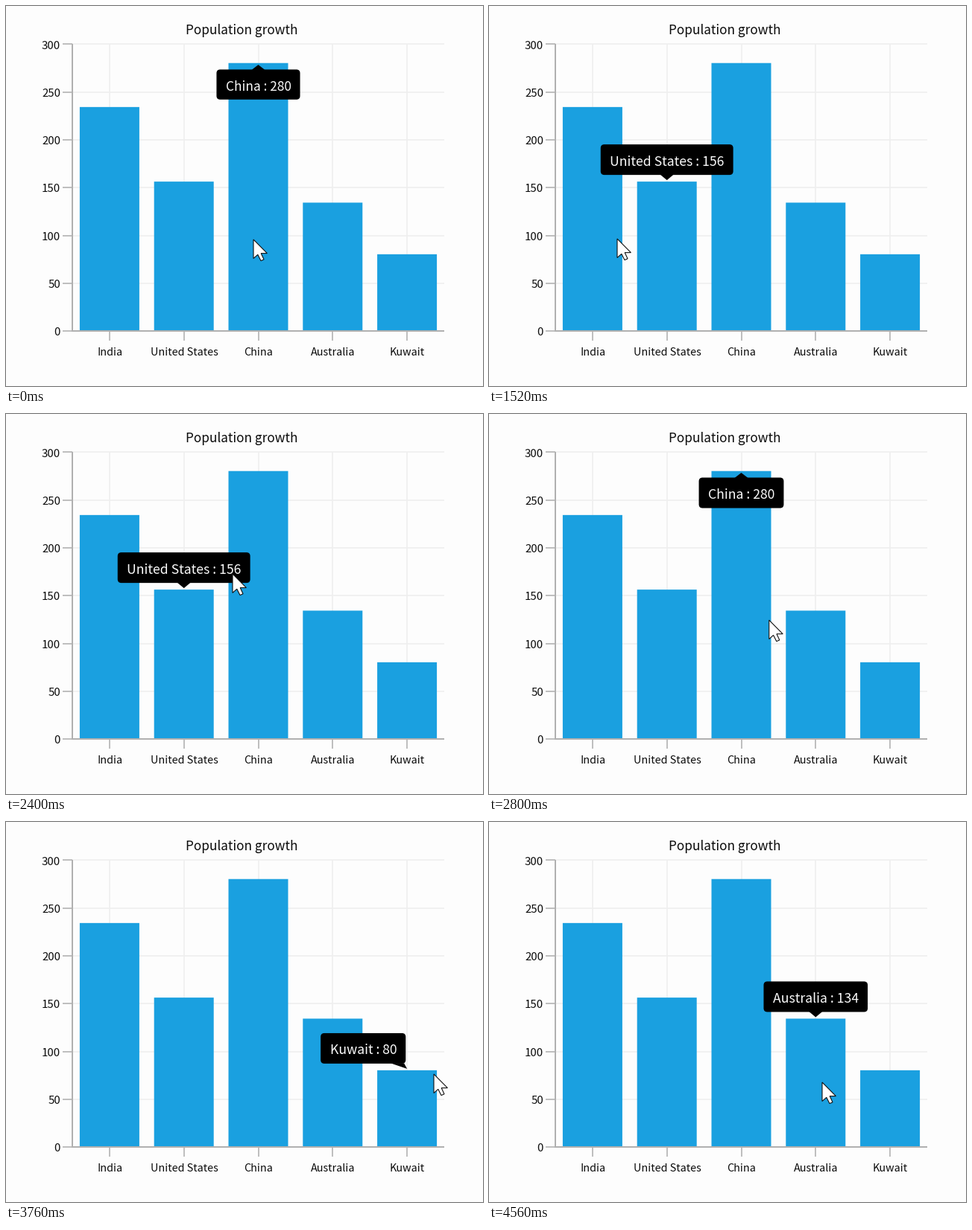
Write a matplotlib script that moves like this. It is 640 by 511 pixels and loops after 4640 ms.

```python
import matplotlib.pyplot as plt
import numpy as np
from matplotlib.animation import FuncAnimation
from matplotlib.patches import FancyBboxPatch, Polygon, Rectangle

plt.rcParams["font.family"] = "Noto Sans CJK JP"

W, H, DPI = 640, 511, 100
STEP, FRAMES = 80, 58

LEFT, RIGHT, TOP, BASE = 89, 588, 51, 436.7
SLOT = (RIGHT - LEFT) / 5
DATA = {"India": 234, "United States": 156, "China": 280,
        "Australia": 134, "Kuwait": 80}

BLUE, GRID, AXIS, INK = "#1aa0e0", "#efefef", "#b0b0b0", "#0c0c0c"

NOTE_SIZE, TIP_H, BEAK_H = 17.6, 41, 7
GROW_MS, SHOW_AFTER = 320, 70
HOVERS = [(-240, "China"), (900, "United States"), (2340, "China"),
          (2880, "Australia"), (3480, "Kuwait"), (4240, "Australia")]

# Turning and resting points of the pointer: time in ms, x, y
STOPS = np.array([
    (0, 332, 314), (960, 258, 298), (1520, 172, 313), (1700, 142, 313),
    (2400, 304, 215), (2640, 372, 275), (2720, 372, 275), (3200, 423, 304),
    (3280, 423, 304), (3760, 574, 339), (4400, 447, 350),
])
ARROW = np.array([(0, 0), (0, 25.5), (5.8, 20.3), (10, 28.6), (14, 26.8),
                  (10.2, 18.6), (18.4, 18.6)])


def pt(px):
    return px * 72 / DPI


def bar_x(name):
    return LEFT + SLOT * (list(DATA).index(name) + 0.5)


def value_y(v):
    return BASE - v * (BASE - TOP) / 300


def pointer(t):
    """Ease from one stop to the next."""
    times = STOPS[:, 0]
    k = min(np.searchsorted(times, t, side="right"), len(times) - 1)
    a, b = STOPS[k - 1], STOPS[k]
    u = min((t - a[0]) / (b[0] - a[0]), 1)
    return a[1:] + (b - a)[1:] * u * u * (3 - 2 * u)


fig = plt.figure(figsize=(W / DPI, H / DPI), dpi=DPI, facecolor="#fdfdfd")
ax = fig.add_axes([0, 0, 1, 1])
ax.set_xlim(0, W)
ax.set_ylim(H, 0)
ax.axis("off")


def line(x0, y0, x1, y1, color, width, z):
    ax.plot([x0, x1], [y0, y1], color=color, lw=pt(width), zorder=z,
            solid_capstyle="butt")


def label(x, y, text, size, align="center", color=INK, z=5):
    return ax.text(x, y, text, fontsize=pt(size), ha=align, va="baseline",
                   color=color, zorder=z)


def draw_chart():
    label(316.3, 38.5, "Population growth", 17.15)
    for v in range(0, 301, 50):
        y = value_y(v) + 0.5
        if v:
            line(LEFT, y, RIGHT, y, GRID, 1.6, 1)
        line(76, y, LEFT, y, AXIS, 1.6, 3)
        label(73, y + 6, str(v), 15, "right")
    for name, v in DATA.items():
        x, y = bar_x(name), value_y(v)
        line(x, TOP, x, BASE, GRID, 1.6, 1)
        line(x, BASE, x, 450, AXIS, 1.6, 3)
        ax.add_patch(Rectangle((x - 40, y), 80, BASE - y, fc=BLUE, lw=0,
                               zorder=2, snap=False))
        label(x + 0.4, 470.5, name, 14.35)
    line(88.5, TOP, 88.5, BASE + 1, AXIS, 2, 3)
    line(LEFT, BASE + 0.3, RIGHT, BASE + 0.3, AXIS, 2, 3)


draw_chart()

box = ax.add_patch(FancyBboxPatch((0, 0), 1, 1, fc="black", lw=0, zorder=6))
beak = ax.add_patch(Polygon([(0, 0)] * 3, fc="black", lw=0, zorder=6))
note = label(0, 0, "", NOTE_SIZE, color="#fafafa", z=7)
arrow = ax.add_patch(Polygon(ARROW, fc="white", ec="#101010", lw=pt(1.1),
                             joinstyle="miter", zorder=9))


def tip_text(name):
    return f"{name} : {DATA[name]}"


def tip_width(name):
    note.set_text(tip_text(name))
    return note.get_window_extent().width + 24.5


WIDTHS = {name: tip_width(name) for name in DATA}


def place_tip(name, scale):
    """Lay out a tooltip, scaled about the end of its beak."""
    x, width, top = bar_x(name), WIDTHS[name], value_y(DATA[name])
    below = top - TIP_H - BEAK_H < TOP
    tip = np.array([x, top + 2.3 if below else top - 2])
    box_top = BEAK_H - 0.5 if below else -TIP_H - BEAK_H
    edge = BEAK_H if below else -BEAK_H - 0.5

    # Near the right side the box sits wholly left of its beak.
    crowded = x + width / 2 > RIGHT
    left = -width - 1.8 if crowded else -width / 2
    beak_mid = -13 if crowded else 0

    x0, y0 = tip + scale * np.array([left, box_top])
    box.set_boxstyle("round", pad=0, rounding_size=5 * scale)
    box.set_bounds(x0, y0, width * scale, TIP_H * scale)
    shape = np.array([(beak_mid - 9, edge), (beak_mid + 9, edge), (0, 0)])
    beak.set_xy(tip + scale * shape)
    note.set_text(tip_text(name))
    note.set_fontsize(pt(NOTE_SIZE * scale))
    note.set_position(tip + scale * np.array([left + width / 2 + 0.3,
                                              box_top + 28.6]))


def update(k):
    t = k * STEP
    start, name = [h for h in HOVERS if t - h[0] >= SHOW_AFTER][-1]
    rest = 1 - min((t - start) / GROW_MS, 1)
    place_tip(name, 1 - rest ** 3)
    arrow.set_xy(ARROW + pointer(t))
    return box, beak, note, arrow


anim = FuncAnimation(fig, update, frames=FRAMES, interval=STEP,
                     init_func=lambda: update(0), repeat=True)
plt.show()
```
